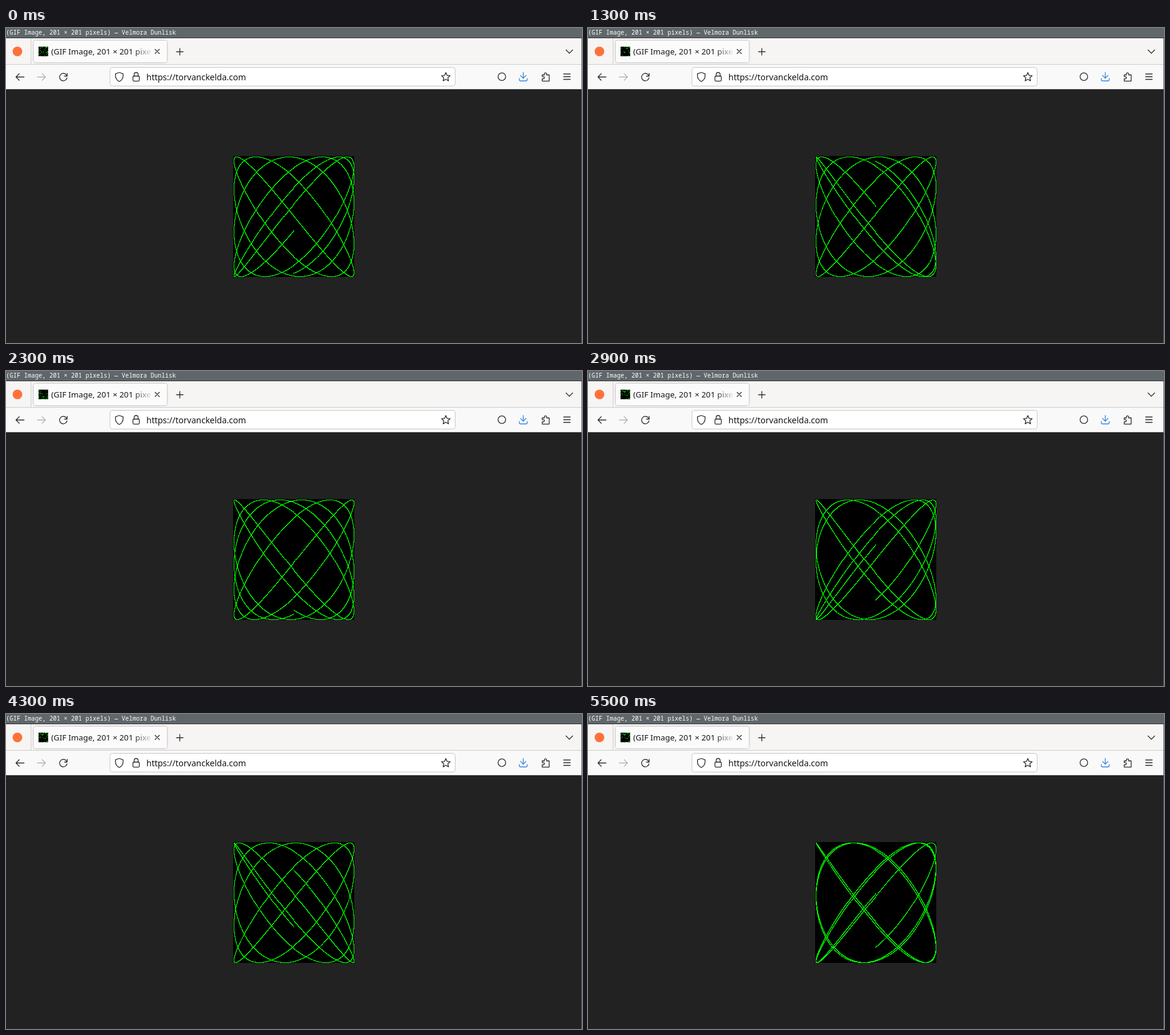
An HTML page with a canvas for the animation above (5600 ms loop, 956 px wide and 524 px high).

```html
<!DOCTYPE html>
<html lang="en">
<head>
<meta charset="utf-8">
<title>Lissajous</title>
<style>
  html, body { margin: 0; width: 100%; height: 100%; overflow: hidden; background: #222; }
  svg, canvas { position: absolute; display: block; }
  svg { left: 0; top: 0; }
  text { white-space: pre; }
  .ui { font-family: "Noto Sans", sans-serif; fill: #15141a; }
  .icon { fill: none; stroke: #2b2a33; stroke-width: 1.3; stroke-linecap: round; stroke-linejoin: round; }
  #plot { left: 377px; top: 213px; }
  #favicon { left: 54px; top: 31px; }
</style>
</head>
<body>
<svg width="956" height="524" viewBox="0 0 956 524">
  <defs>
    <linearGradient id="fade">
      <stop offset="0" stop-color="#fcfbfb" stop-opacity="0"/>
      <stop offset="1" stop-color="#fcfbfb"/>
    </linearGradient>
    <filter id="shadow" x="-5%" y="-20%" width="110%" height="140%">
      <feDropShadow dx="0" dy="0" stdDeviation="1.5" flood-color="#000" flood-opacity=".4"/>
    </filter>
  </defs>

  <!-- window title -->
  <rect width="956" height="16" fill="#5f676a"/>
  <rect y="16" width="956" height="1" fill="#333"/>
  <text x="0" y="11" font-size="10" fill="#fff" font-family="'Noto Sans Mono', monospace">(GIF Image, 201 × 201 pixels) — Velmora Dunlisk</text>

  <!-- tab strip -->
  <rect y="17" width="956" height="43" fill="#f6f5f4"/>
  <rect y="60" width="956" height="1" fill="#cdcccb"/>
  <rect x="41" y="17" width="1" height="43" fill="#cfcecd"/>
  <circle cx="19" cy="39" r="8" fill="#ff7139"/>
  <rect x="46" y="21" width="221" height="36" rx="4" fill="#fcfbfb" filter="url(#shadow)"/>
  <text class="ui" x="75" y="44" font-size="13.333">(GIF Image, 201 × 201 pixe</text>
  <rect x="211" y="28" width="33" height="24" fill="url(#fade)"/>
  <g class="icon">
    <path d="M247.5 35.5l7 7m0-7l-7 7"/>
    <path d="M283 39.5h11M288.5 34v11"/>
    <path d="M929.5 36.5l5.5 5.5 5.5-5.5"/>
  </g>

  <!-- toolbar -->
  <rect y="61" width="956" height="40" fill="#faf9f9"/>
  <rect y="101" width="956" height="1" fill="#cdcccb"/>
  <rect x="172.5" y="65.5" width="573" height="31" rx="4" fill="#fff" stroke="#c8c7c6"/>
  <text class="ui" x="233" y="87" font-size="14">https://torvanckelda.com</text>
  <g class="icon">
    <path d="M30 81.5H16.5m5.5-5.5l-5.5 5.5 5.5 5.5"/>
    <path stroke="#b4b3b4" d="M52 81.5h13.5m-5.5-5.5l5.5 5.5-5.5 5.5"/>
    <path d="M100.500 78.500a6.200 6.200 0 1 0 .7 4.500M101.500 75.500v4.500h-4.500"/>
    <path d="M188 74l6.300 2.200v3.300c0 4.500-2.300 7.500-6.300 9.500-4-2-6.300-5-6.300-9.500v-3.300z"/>
    <rect x="210.700" y="80" width="10.600" height="8.300" rx="1.500"/>
    <path d="M212.700 80v-2.700a3.300 3.300 0 0 1 6.600 0V80"/>
    <path id="star"/>
    <circle cx="823" cy="81" r="6.300"/>
    <path stroke="#3584e4" d="M858.500 74v9.500m-4.500-4.500l4.500 4.500 4.500-4.500M852 84v2q0 2 2 2h9q2 0 2-2v-2"/>
    <path d="M890 78h3.500v-1.500a1.900 1.900 0 0 1 3.800 0V78h4.200v10.300H890v-3.800h1.800a1.800 1.800 0 0 0 0-3.600H890z"/>
    <path d="M925.500 76.500h11m-11 4.500h11m-11 4.500h11"/>
  </g>

  <rect y="102" width="956" height="422" fill="#222"/>
  <rect x="955" y="17" width="1" height="507" fill="#5f676a"/>
</svg>
<canvas id="plot" width="201" height="201"></canvas>
<canvas id="favicon" width="16" height="16"></canvas>

<script>
const LOOP = 5600, TICK = 100;
const RADIUS = 100, SIDE = 2 * RADIUS + 1;
const CYCLES = 5, STEP = 0.001, FREQ = 1.2321;
const PHASES = 64;
const ICON = 16, ICON_STOP = 2600;
const GREEN = 0xff00ff00, BLACK = 0xff000000;

// [time, phase step] pairs; the pace wavers slightly
const PACE = [[0, 19], [600, 33], [1300, 51], [2300, 74], [3700, 106], [4800, 133], [5500, 151]];
// stretches where the picture stands still
const HOLDS = [[2600, 2900], [2900, 3300]];

const plot = document.getElementById('plot').getContext('2d');
const favicon = document.getElementById('favicon').getContext('2d');

function starPath(cx, cy, outer, inner) {
  const points = Array.from({ length: 10 }, (_, i) => {
    const r = i % 2 ? inner : outer, a = i * Math.PI / 5 - Math.PI / 2;
    return (cx + r * Math.cos(a)).toFixed(2) + ' ' + (cy + r * Math.sin(a)).toFixed(2);
  });
  return 'M' + points.join('L') + 'Z';
}

function held(time) {
  const tick = Math.floor(time / TICK) * TICK;
  const hold = HOLDS.find(([from, to]) => tick >= from && tick < to);
  return hold ? hold[0] : tick;
}

function phaseStep(time) {
  let i = 1;
  while (i < PACE.length - 1 && time > PACE[i][0]) i++;
  const [t0, s0] = PACE[i - 1], [t1, s1] = PACE[i];
  return Math.round(s0 + (s1 - s0) * (time - t0) / (t1 - t0)) % PHASES;
}

function curve(step) {
  const pixels = new Uint32Array(SIDE * SIDE).fill(BLACK);
  const cell = v => RADIUS + Math.trunc(v * RADIUS + 0.5);
  const end = CYCLES * 2 * Math.PI;
  for (let t = 0; t < end; t += STEP) {
    pixels[cell(Math.sin(t * FREQ + step * 0.1)) * SIDE + cell(Math.sin(t))] = GREEN;
  }
  return pixels;
}

function shrink(pixels) {
  const at = i => Math.floor((i + 0.5) * SIDE / ICON);
  return Uint32Array.from({ length: ICON * ICON },
    (_, i) => pixels[at(Math.floor(i / ICON)) * SIDE + at(i % ICON)]);
}

function show(ctx, pixels, side) {
  ctx.putImageData(new ImageData(new Uint8ClampedArray(pixels.buffer), side, side), 0, 0);
}

let shown = -1;
function frame() {
  const time = held(performance.now() % LOOP);
  if (time !== shown) {
    shown = time;
    const pixels = curve(phaseStep(time));
    const small = time > ICON_STOP ? curve(phaseStep(ICON_STOP)) : pixels;
    show(plot, pixels, SIDE);
    show(favicon, shrink(small), ICON);
  }
  requestAnimationFrame(frame);
}

document.getElementById('star').setAttribute('d', starPath(730, 81.7, 7.6, 3.5));
frame();
</script>
</body>
</html>
```
